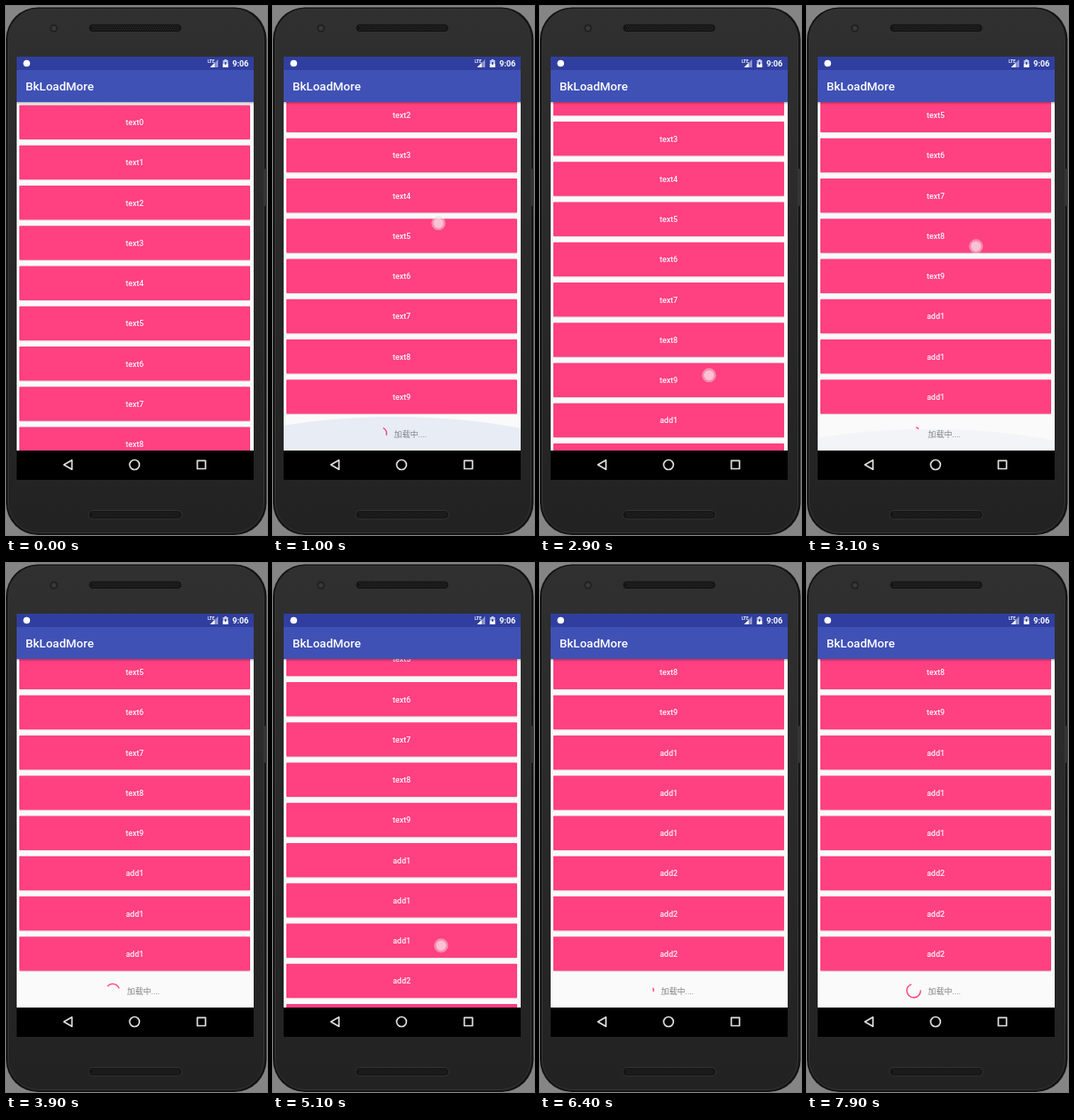
An HTML page with a canvas for the animation above (8000 ms loop, 294 by 595 pixels).

```html
<!DOCTYPE html>
<html lang="zh">
<head>
<meta charset="utf-8">
<title>BkLoadMore</title>
<style>
html, body { margin: 0; width: 100%; height: 100%; overflow: hidden; background: #858585; }
canvas { display: block; width: 294px; height: 595px; }
</style>
</head>
<body>
<canvas id="stage"></canvas>
<script>
const W = 294, H = 595, LOOP = 8000, STEP = 100;
const SCREEN = { x: 12, y: 57, w: 267 };
const LIST = { top: 108, bottom: 500 };
const PITCH = 45.25, FIRST = 130.8, CARD_H = 38.5;
const PINK = '#ff4081';
const FONT = 'Roboto, "Noto Sans CJK SC", "Noto Sans CJK", sans-serif';

const canvas = document.getElementById('stage');
const ctx = canvas.getContext('2d');
const dpr = window.devicePixelRatio || 1;
canvas.width = W * dpr;
canvas.height = H * dpr;

const SCROLL = [
  [600, 0], [700, 10], [800, 60], [900, 98.5],
  [2800, 98.5], [2900, 117.3], [3000, 198], [3100, 234.25],
  [5000, 234.25], [5100, 249], [5200, 296], [5300, 332], [5400, 358.5], [5500, 368], [5600, 370]
];
const TOUCHES = [
  { x: 186, path: [[700, 395], [800, 345], [900, 290], [1000, 244], [1100, 217]] },
  { x: 190, path: [[2900, 415], [3000, 334], [3100, 270], [3200, 252]] },
  { x: 189, path: [[5100, 430], [5200, 383], [5300, 347], [5400, 320], [5500, 310]] },
  { x: 185, path: [[7400, 481]] }
];
const GLOW = [
  [800, 0], [900, 0.4], [1000, 1], [1100, 1], [1500, 0],
  [3000, 0], [3100, 0.4], [3200, 0.7], [3600, 0]
];
const LOADS = [825, 2985, 5330, 7420];
const FAILED = { from: 6800, to: 7500 };

function track(keys, t) {
  if (t <= keys[0][0]) return keys[0][1];
  for (let i = 1; i < keys.length; i++) {
    const [t0, v0] = keys[i - 1], [t1, v1] = keys[i];
    if (t <= t1) return v0 + (v1 - v0) * (t - t0) / (t1 - t0);
  }
  return keys[keys.length - 1][1];
}

// cubic-bezier(.4, 0, .2, 1)
function ease(x) {
  if (x <= 0) return 0;
  if (x >= 1) return 1;
  let lo = 0, hi = 1, u = 0.5;
  for (let i = 0; i < 24; i++) {
    u = (lo + hi) / 2;
    const bx = 1.2 * u * (1 - u) ** 2 + 0.6 * u * u * (1 - u) + u ** 3;
    if (bx < x) lo = u; else hi = u;
  }
  return 3 * u * u - 2 * u ** 3;
}

function box(x, y, w, h, fill) {
  ctx.fillStyle = fill;
  ctx.fillRect(x, y, w, h);
}

function pill(x, y, w, h, r, fill, stroke, line = 1) {
  ctx.beginPath();
  ctx.roundRect(x, y, w, h, r);
  if (fill) { ctx.fillStyle = fill; ctx.fill(); }
  if (stroke) { ctx.strokeStyle = stroke; ctx.lineWidth = line; ctx.stroke(); }
}

function disc(x, y, r, fill) {
  ctx.beginPath();
  ctx.arc(x, y, r, 0, Math.PI * 2);
  ctx.fillStyle = fill;
  ctx.fill();
}

function poly(points, fill) {
  ctx.beginPath();
  points.forEach(([x, y]) => ctx.lineTo(x, y));
  ctx.closePath();
  if (fill) { ctx.fillStyle = fill; ctx.fill(); } else ctx.stroke();
}

function label(str, x, y, size, color, align = 'left', weight = 400) {
  ctx.font = `${weight} ${size}px ${FONT}`;
  ctx.textAlign = align;
  ctx.fillStyle = color;
  ctx.fillText(str, x, y);
}

function gradient(y0, y1, from, to) {
  const g = ctx.createLinearGradient(0, y0, 0, y1);
  g.addColorStop(0, from);
  g.addColorStop(1, to);
  return g;
}

function speaker(y) {
  pill(93, y, 105, 9.5, 4.7, '#151515', '#333');
  ctx.fillStyle = '#353535';
  for (let r = 0; r < 3; r++)
    for (let x = 97 + r % 2; x < 195; x += 2)
      ctx.fillRect(x, y + 2.2 + r * 2, 0.9, 0.9);
}

function drawPhone() {
  box(0, 0, W, H, '#858585');
  pill(0, 1.5, 293.5, 593.5, 36, '#141414');
  pill(2.5, 3.5, 288, 589, 34, gradient(0, H, '#303030', '#222222'), '#353535');
  pill(291, 183, 2.5, 42, 1, '#333');
  disc(54, 25, 4.5, '#202020');
  disc(54, 25, 2.6, '#3c3838');
  speaker(20);
  speaker(567.5);
}

function drawBars() {
  const { x, y, w } = SCREEN;
  box(x, y, w, 15, '#303f9f');
  box(x, 72, w, 36, '#3f51b5');
  disc(23.3, 64.5, 3.8, '#fff');
  label('LTE', 227.3, 64, 4.6, '#fff', 'left', 700);
  poly([[239, 60], [239, 69], [230, 69]], 'rgba(255,255,255,.45)');
  poly([[235, 64], [235, 69], [230, 69]], '#fff');
  box(246, 60, 2.6, 1.2, '#c5cae9');
  box(244.4, 61, 5.8, 8, '#c5cae9');
  box(244.4, 65, 5.8, 4, '#fff');
  box(246.5, 63, 1.6, 3, '#303f9f');
  label('9:06', 273.3, 68, 9.2, '#fff', 'right', 700);
  label('BkLoadMore', 22, 95, 13.5, '#fff', 'left', 500);

  box(x, LIST.bottom, w, 533 - LIST.bottom, '#000');
  ctx.strokeStyle = '#dedede';
  ctx.lineWidth = 1.7;
  ctx.lineJoin = 'round';
  poly([[65.2, 516], [74.3, 510.8], [74.3, 521.2]]);
  ctx.beginPath();
  ctx.arc(144.8, 516, 5.5, 0, Math.PI * 2);
  ctx.stroke();
  ctx.strokeRect(215.5, 511.3, 9.2, 9.2);
}

function drawCard(text, cy) {
  const y = cy - CARD_H / 2;
  box(15, y + CARD_H, 260, 1, 'rgba(0,0,0,.09)');
  pill(15, y, 260, CARD_H, 0.8, PINK);
  label(text, 145, cy + 3.3, 9, 'rgba(255,255,255,.93)', 'center', 500);
}

function drawSpinner(cx, cy, ms) {
  const p = (ms % 1333) / 1333;
  const base = -90 + ms * 0.108 + 90 * p;
  const start = base + 270 * ease(2 * p - 1);
  const end = Math.max(base + 270 * ease(2 * p), start + 10);
  const rad = Math.PI / 180;
  ctx.beginPath();
  ctx.arc(cx, cy, 7.7, start * rad, end * rad);
  ctx.strokeStyle = PINK;
  ctx.lineWidth = 1.4;
  ctx.stroke();
}

function drawFooter(cy, t) {
  if (t >= FAILED.from && t < FAILED.to) {
    label('加载失败，点击重试', 145, cy + 3.4, 9.1, '#858585', 'center');
    return;
  }
  const begin = LOADS.filter(s => s <= t).pop();
  if (begin === undefined) return;
  drawSpinner(120.2, cy, t - begin);
  label('加载中....', 136.3, cy + 3.4, 9.1, '#858585');
}

function drawGlow(k) {
  if (k <= 0) return;
  const rise = 38 * (0.4 + 0.6 * k), r = 400;
  ctx.save();
  ctx.translate(137, LIST.bottom - rise);
  ctx.scale(1, 0.5);
  disc(0, r, r, `rgba(70,110,190,${0.1 * k})`);
  ctx.restore();
}

function drawTouch(t) {
  for (const { x, path } of TOUCHES) {
    if (t < path[0][0] || t > path[path.length - 1][0]) continue;
    const y = track(path, t);
    disc(x + 0.4, y + 0.3, 8, 'rgba(232,216,224,.5)');
    disc(x + 0.4, y + 0.3, 5.6, 'rgba(255,205,222,.8)');
  }
}

function drawList(t) {
  const { x, w } = SCREEN;
  ctx.save();
  ctx.beginPath();
  ctx.rect(x, LIST.top, w, LIST.bottom - LIST.top);
  ctx.clip();
  box(x, LIST.top, w, LIST.bottom - LIST.top, '#fafafa');

  const count = t < 2500 ? 10 : t < 4700 ? 13 : 16;
  const scroll = track(SCROLL, t);
  for (let i = 0; i < count; i++) {
    const cy = FIRST + i * PITCH - scroll;
    if (cy < 85 || cy > 525) continue;
    drawCard(i < 10 ? 'text' + i : i < 13 ? 'add1' : 'add2', cy);
  }
  drawFooter(FIRST + count * PITCH - scroll - 3.7, t);
  drawGlow(track(GLOW, t));
  box(x, LIST.top, w, 3, gradient(LIST.top, LIST.top + 3, 'rgba(0,0,0,.28)', 'rgba(0,0,0,0)'));
  ctx.restore();
}

function render(t) {
  ctx.setTransform(dpr, 0, 0, dpr, 0, 0);
  drawPhone();
  drawList(t);
  drawBars();
  drawTouch(t);
}

const t0 = performance.now();
function tick() {
  const ms = (performance.now() - t0) % LOOP;
  render(Math.floor(ms / STEP) * STEP);
  requestAnimationFrame(tick);
}
tick();
</script>
</body>
</html>
```
